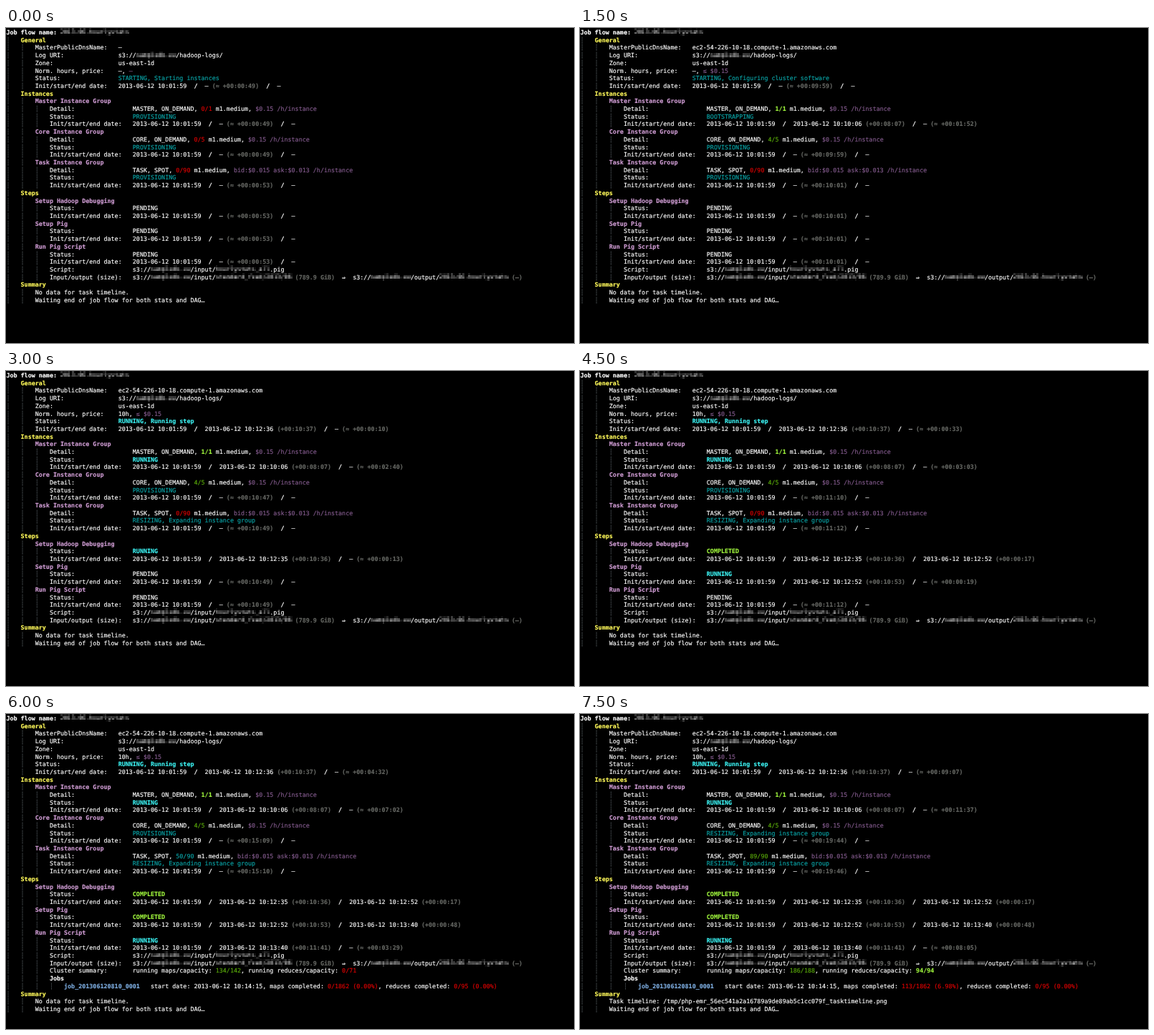
Animation of 793x441 px, one loop 8 s. Source, as an HTML page with a canvas:

```html
<!DOCTYPE html>
<html lang="en">
<head>
<meta charset="utf-8">
<title>Job flow monitor</title>
<style>
  html, body { margin: 0; width: 100%; height: 100%; overflow: hidden; background: #000; }
  canvas { display: block; }
</style>
</head>
<body>
<canvas id="terminal" width="793" height="441"></canvas>
<script>
const CELL_W = 8, CELL_H = 17, SCALE = 0.63, BASELINE = 13.6, MARGIN = 0.4;
const FONT = '13.3px "DejaVu Sans Mono", monospace';
const STEP = 1500, LOOP = 8000;

// Markup is [style|text]; capital styles are bold, M is a pixelated word.
const COLORS = {
  w: '#fff', W: '#fff', Y: '#fff95a', P: '#cc9ad0', p: '#825a8c',
  c: '#0aa3a6', C: '#3cf2f2', r: '#dc0000', g: '#58a80a', G: '#9cf03c',
  K: '#646662', B: '#7cabde', i: '#454b4e'
};

const ctx = document.getElementById('terminal').getContext('2d');

const phase = (delta, at) => at
  ? `2013-06-12 ${at} [K|(+00:${delta})]`
  : `— [K|(≈ +00:${delta})]`;
const times = (start, end = '—') =>
  `2013-06-12 10:01:59  [W|/]  ${start}  [W|/]  ${end}`;
const waiting = delta => times(phase(delta));

const PENDING = 'PENDING';
const PROVISIONING = '[c|PROVISIONING]';
const RESIZING = '[c|RESIZING, Expanding instance group]';
const RUNNING = '[C|RUNNING]';
const COMPLETED = '[G|COMPLETED]';
const BUCKET = 's3://[M|sampledb-eu]';

const flowStart = phase('10:37', '10:12:36');
const masterStart = phase('08:07', '10:10:06');
const debugStart = phase('10:36', '10:12:35');
const debugDone = times(debugStart, phase('00:17', '10:12:52'));
const pigStart = phase('10:53', '10:12:52');
const pigDone = times(pigStart, phase('00:48', '10:13:40'));
const scriptStart = phase('11:41', '10:13:40');

// Each state lists only what differs from the one before; pairs are [status, times].
const changes = [
  {
    dns: '—', price: '—, [p|—]',
    flow: ['[c|STARTING, Starting instances]', waiting('00:49')],
    masterCount: '[r|0/1]', master: [PROVISIONING, waiting('00:49')],
    coreCount: '[r|0/5]', core: [PROVISIONING, waiting('00:49')],
    taskCount: '[r|0/90]', task: [PROVISIONING, waiting('00:53')],
    debug: [PENDING, waiting('00:53')],
    pig: [PENDING, waiting('00:53')],
    script: [PENDING, waiting('00:53')],
    timeline: 'No data for task timeline.'
  },
  {
    dns: 'ec2-54-226-10-18.compute-1.amazonaws.com', price: '—, [p|≤ $0.15]',
    flow: ['[c|STARTING, Configuring cluster software]', waiting('09:59')],
    masterCount: '[G|1/1]', master: ['[c|BOOTSTRAPPING]', times(masterStart, phase('01:52'))],
    coreCount: '[g|4/5]', core: [PROVISIONING, waiting('09:59')],
    task: [PROVISIONING, waiting('10:01')],
    debug: [PENDING, waiting('10:01')],
    pig: [PENDING, waiting('10:01')],
    script: [PENDING, waiting('10:01')]
  },
  {
    price: '10h, [p|≤ $0.15]',
    flow: ['[C|RUNNING, Running step]', times(flowStart, phase('00:10'))],
    master: [RUNNING, times(masterStart, phase('02:40'))],
    core: [PROVISIONING, waiting('10:47')],
    task: [RESIZING, waiting('10:49')],
    debug: [RUNNING, times(debugStart, phase('00:13'))],
    pig: [PENDING, waiting('10:49')],
    script: [PENDING, waiting('10:49')]
  },
  {
    flow: ['[C|RUNNING, Running step]', times(flowStart, phase('00:33'))],
    master: [RUNNING, times(masterStart, phase('03:03'))],
    core: [PROVISIONING, waiting('11:10')],
    task: [RESIZING, waiting('11:12')],
    debug: [COMPLETED, debugDone],
    pig: [RUNNING, times(pigStart, phase('00:19'))],
    script: [PENDING, waiting('11:12')]
  },
  {
    flow: ['[C|RUNNING, Running step]', times(flowStart, phase('04:32'))],
    master: [RUNNING, times(masterStart, phase('07:02'))],
    core: [PROVISIONING, waiting('15:09')],
    taskCount: '[c|50/90]', task: [RESIZING, waiting('15:10')],
    pig: [COMPLETED, pigDone],
    script: [RUNNING, times(scriptStart, phase('03:29'))],
    jobs: { maps: '[g|134/142]', reduces: '[r|0/71]', mapsDone: '0/1862 (0.00%)' }
  },
  {
    flow: ['[C|RUNNING, Running step]', times(flowStart, phase('09:07'))],
    master: [RUNNING, times(masterStart, phase('11:37'))],
    core: [RESIZING, waiting('19:44')],
    taskCount: '[g|89/90]', task: [RESIZING, waiting('19:46')],
    script: [RUNNING, times(scriptStart, phase('08:05'))],
    jobs: { maps: '[g|186/188]', reduces: '[G|94/94]', mapsDone: '113/1862 (6.98%)' },
    timeline: 'Task timeline: /tmp/php-emr_56ec541a2a16789a9de89ab5c1cc079f_tasktimeline.png'
  }
];

const states = [];
for (const change of changes) states.push({ ...states.at(-1), ...change });

const line = (depth, text) => '[i|┆]   '.repeat(depth) + text;
const field = (depth, label, value) => line(depth, (label + ':').padEnd(23) + value);
const progress = (depth, [status, dates]) => [
  field(depth, 'Status', status),
  field(depth, 'Init/start/end date', dates)
];
const group = (name, detail, state) => [
  line(2, `[P|${name} Instance Group]`),
  field(3, 'Detail', detail),
  ...progress(3, state)
];
const step = (name, state) => [line(2, `[P|${name}]`), ...progress(3, state)];

const jobLines = jobs => jobs ? [
  field(3, 'Cluster summary',
    `running maps/capacity: ${jobs.maps}, running reduces/capacity: ${jobs.reduces}`),
  line(3, '[W|Jobs]'),
  line(4, '[B|job_201306120810_0001]   start date: 2013-06-12 10:14:15, ' +
    `maps completed: [r|${jobs.mapsDone}], reduces completed: [r|0/95 (0.00%)]`)
] : [];

const screen = s => [
  '[W|Job flow name:] [M|2013-06-hourlystats]',
  line(1, '[Y|General]'),
  field(2, 'MasterPublicDnsName', s.dns),
  field(2, 'Log URI', `${BUCKET}/hadoop-logs/`),
  field(2, 'Zone', 'us-east-1d'),
  field(2, 'Norm. hours, price', s.price),
  ...progress(2, s.flow),
  line(1, '[Y|Instances]'),
  ...group('Master', `MASTER, ON_DEMAND, ${s.masterCount} m1.medium, [p|$0.15 /h/instance]`, s.master),
  ...group('Core', `CORE, ON_DEMAND, ${s.coreCount} m1.medium, [p|$0.15 /h/instance]`, s.core),
  ...group('Task', `TASK, SPOT, ${s.taskCount} m1.medium, [p|bid:$0.015 ask:$0.013 /h/instance]`, s.task),
  line(1, '[Y|Steps]'),
  ...step('Setup Hadoop Debugging', s.debug),
  ...step('Setup Pig', s.pig),
  ...step('Run Pig Script', s.script),
  field(3, 'Script', `${BUCKET}/input/[M|hourlystats_all].pig`),
  field(3, 'Input/output (size)',
    `${BUCKET}/input/[M|standard_feed/2013/06] [K|(789.9 GiB)]  ⇒  ` +
    `${BUCKET}/output/[M|2013-06-hourlystats] [K|(—)]`),
  ...jobLines(s.jobs),
  line(1, '[Y|Summary]'),
  line(2, s.timeline),
  line(2, 'Waiting end of job flow for both stats and DAG…')
];

function drawPixelated(text, x, y) {
  const block = CELL_H / 4;
  const small = document.createElement('canvas');
  small.width = Math.ceil(text.length * CELL_W / block);
  small.height = 4;
  const pen = small.getContext('2d');
  pen.scale(1 / block, 1 / block);
  pen.font = FONT;
  pen.textRendering = 'geometricPrecision';
  pen.fillStyle = '#fff';
  pen.fillText(text, 0, BASELINE);
  ctx.drawImage(small, x, y, small.width * block, CELL_H);
}

function drawLine(markup, row) {
  let column = 0;
  const y = row * CELL_H;
  for (const [plain, style = 'w', styled] of markup.matchAll(/\[(\w)\|([^\]]*)\]|[^\[]+/g)) {
    const text = styled ?? plain;
    if (style === 'M') {
      drawPixelated(text, column * CELL_W, y);
    } else {
      ctx.font = (style < 'a' ? 'bold ' : '') + FONT;
      ctx.fillStyle = ctx.strokeStyle = COLORS[style];
      [...text].forEach((char, i) => {
        const x = (column + i) * CELL_W;
        ctx.fillText(char, x, y + BASELINE);
        ctx.strokeText(char, x, y + BASELINE);
      });
    }
    column += text.length;
  }
}

function draw(state) {
  ctx.setTransform(1, 0, 0, 1, 0, 0);
  ctx.fillStyle = '#000';
  ctx.fillRect(0, 0, 793, 441);
  ctx.setTransform(SCALE, 0, 0, SCALE, MARGIN, MARGIN);
  ctx.textRendering = 'geometricPrecision';
  ctx.imageSmoothingEnabled = false;
  ctx.lineWidth = 0.25; // slightly heavier strokes, as in a terminal
  screen(state).forEach(drawLine);
}

const startTime = performance.now();
let shown = -1;
function tick() {
  const index = Math.floor((performance.now() - startTime) % LOOP / STEP);
  if (index !== shown) draw(states[shown = index]);
  requestAnimationFrame(tick);
}
tick();
</script>
</body>
</html>
```
